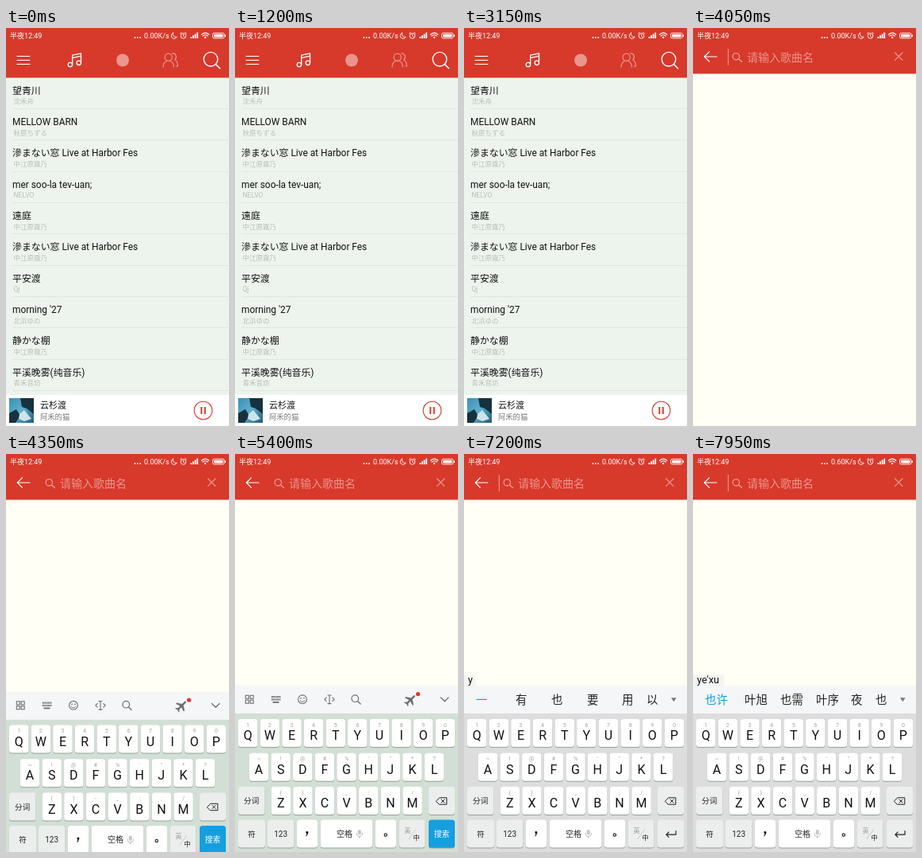
Animation of 281x500 px, one loop 8 s. Source, as an HTML page:

```html
<!DOCTYPE html>
<html lang="zh">
<head>
<meta charset="utf-8">
<style>
  html, body { margin: 0; width: 100%; height: 100%; overflow: hidden; }
  svg { display: block; width: 100%; height: 100%; font-family: Roboto, "Noto Sans CJK SC", "Noto Sans CJK", sans-serif; }
  .line { fill: none; stroke-linecap: round; stroke-linejoin: round; }
</style>
</head>
<body>
<svg id="stage" viewBox="0 0 281 500" preserveAspectRatio="none"></svg>
<script>
const LOOP = 8000;
const RED = '#d7392b', PINK = '#eb958d', GRAY = '#6d7072', BLUE = '#159fe0';

const songs = [
  ['望青川', '沈禾舟'],
  ['MELLOW BARN', '秋原ちずる'],
  ['滲まない窓 Live at Harbor Fes', '中江原霧乃'],
  ['mer soo-la tev-uan;', 'NELVO'],
  ['遠庭', '中江原霧乃'],
  ['滲まない窓 Live at Harbor Fes', '中江原霧乃'],
  ['平安渡', 'Qj'],
  ["morning '27", '北浜ゆの'],
  ['静かな棚', '中江原霧乃'],
  ['平溪晚雾(纯音乐)', '青禾音坊']
];

// Input states: start time, pinyin, candidates
const typing = [
  [7050, 'y', ['一', '有', '也', '要', '用', '以']],
  [7350, 'ye', ['也', '夜', '业', '叶', '页', '爷']],
  [7650, "ye'x", ['也许', '也想', '也行', '也需', '夜', '也']],
  [7800, "ye'xu", ['也许', '叶旭', '也需', '叶序', '夜', '也']]
];
const candidateX = [15, 65, 110, 155, 199, 230];

const text = (x, y, size, fill, str, extra = '') =>
  `<text x="${x}" y="${y}" font-size="${size}" fill="${fill}" ${extra}>${str}</text>`;
const centered = (x, y, size, fill, str) => text(x, y, size, fill, str, 'text-anchor="middle"');
const rect = (x, y, w, h, fill, rx = 0) =>
  `<rect x="${x}" y="${y}" width="${w}" height="${h}" rx="${rx}" fill="${fill}"/>`;
const line = (d, color, width = 1) =>
  `<path class="line" d="${d}" stroke="${color}" stroke-width="${width}"/>`;
const ring = (x, y, r, color, width = 1) =>
  `<circle cx="${x}" cy="${y}" r="${r}" fill="none" stroke="${color}" stroke-width="${width}"/>`;
const dot = (x, y, r, fill) => `<circle cx="${x}" cy="${y}" r="${r}" fill="${fill}"/>`;

function statusBar() {
  const w = '#fff';
  const bars = [0, 1, 2, 3].map(i => rect(232.5 + i * 2.6, 11 - i * 1.8, 1.8, 2 + i * 1.8, w)).join('');
  return text(5, 12.9, 9, w, '半夜12:49')
    + [162.5, 165.8, 169.1].map(x => dot(x, 12, 0.95, w)).join('')
    + text(174, 12.9, 9, w, '0.00K/s', 'id="speed"')
    + line('M210.4 6.2a3.7 3.7 0 1 0 4.8 5a4 4 0 0 1-4.8-5z', w, 0.9)
    + ring(223.5, 9.9, 3.3, w, 0.9) + line('M223.5 8v2.1l1.5 .8M219.6 7l1.7-1.5M227.4 7l-1.7-1.5', w, 0.9)
    + bars
    + line('M246.4 8.2q4.7-4 9.4 0M248 10q3.1-2.5 6.2 0', w, 1.2) + dot(251.1, 11.9, 1.2, w)
    + `<rect x="260.5" y="6.3" width="14.5" height="6.6" rx="1.8" fill="none" stroke="#fff" stroke-width=".9"/>`
    + rect(262, 7.8, 11.5, 3.6, w, 0.8) + rect(275.6, 8.2, 1.4, 2.8, w, 0.5);
}

function listPage() {
  const rows = songs.map(([title, artist], i) => {
    const y = i * 39.35;
    return text(8, 82.5 + y, 11.9, '#111', title)
      + text(9.5, 95.2 + y, 8.5, '#b9beb9', artist)
      + rect(8, Math.round(101 + y), 273, 1, '#e1e7e0');
  }).join('');
  const header = rect(0, 0, 281, 62.5, RED)
    + line('M14 35.5H30M14 40.5H30M14 45.5H30', '#fff', 1)
    + line('M83.7 46V34.2L94.5 31.8V43.5M83.7 37.6L94.5 35.2', '#fff', 1.3)
    + ring(80.9, 46, 2.7, '#fff', 1.3) + ring(91.8, 43.8, 2.7, '#fff', 1.3)
    + dot(147, 40.5, 8, PINK)
    + ring(204.7, 36.7, 4.6, PINK, 1.2)
    + line('M198 49c0-4 2.2-6.8 5-7.8M206.4 41.2c2.8 1 5 3.8 5 7.8', PINK, 1.2)
    + line('M209.5 32c4.8-.5 6.5 5 3.2 8c2.4 1.2 3.8 4 3.8 8h-2.4', PINK, 1.2)
    + ring(258, 39.2, 8.8, '#fff', 1.4) + line('M264.4 45.6l5.2 5.2', '#fff', 1.5);
  const player = rect(0, 461, 281, 39, '#fff')
    + rect(4, 465, 31, 31, 'url(#cover)')
    + `<path d="M18 465h17v20l-9-7-6-2zM4 484l9-5 5 8-6 9H4z" fill="#17323f"/>`
    + `<path d="M17 485l6-5 9 11-9 3-7-3z" fill="#cfe4ea"/>`
    + text(43, 478.2, 11, '#111', '云杉渡')
    + text(43, 491.6, 9.3, '#777', '阿禾的猫')
    + ring(248.5, 480.5, 11.3, RED, 1.1)
    + rect(245.3, 476, 1.9, 9, RED) + rect(249.8, 476, 1.9, 9, RED);
  return rect(0, 0, 281, 500, '#edf4ed') + rows + header + player;
}

function searchPage() {
  return rect(0, 0, 281, 500, '#fffff6') + rect(0, 0, 281, 57.5, RED)
    + line('M30 36H14.5M20.5 29.8L14.3 36L20.5 42.2', '#fff', 1.2)
    + `<g id="cursor">${rect(43.8, 26, 0.9, 21, '#f0a8a0')}</g>`
    + ring(54.3, 35.8, 4.2, PINK, 1.3) + line('M57.5 39l4 3.4', PINK, 1.5)
    + text(68, 42, 14, PINK, '请输入歌曲名')
    + line('M254.5 31l9.4 9.4M263.9 31l-9.4 9.4', PINK, 1.3);
}

const key = (x, y, w, fill = '#fff') =>
  rect(x, y + 1, w, 35, '#93a097', 3.5) + rect(x, y, w, 35, fill, 3.5);

function letterRow(letters, hints, firstX, y) {
  return [...letters].map((letter, i) => {
    const x = firstX + i * 27.63;
    return key(x - 12.2, y, 24.4)
      + centered(x, y + 9.6, 7, '#a0a4a2', hints[i])
      + centered(x, y + 26, 16, '#111', letter);
  }).join('');
}

function toolbar() {
  const squares = [[13.3, 303.3], [19.2, 303.3], [13.3, 309.2], [19.2, 309.2]]
    .map(([x, y]) => `<rect x="${x}" y="${y}" width="4" height="4" fill="none" stroke="${GRAY}" stroke-width="1.1"/>`).join('');
  let board = rect(47.5, 311, 8, 1.8, GRAY);
  for (let i = 0; i < 10; i++) board += rect(46 + i % 5 * 2.4, i < 5 ? 304 : 307.4, 1.7, 2.2, GRAY);
  return squares + board
    + ring(85, 308.3, 5.4, GRAY, 1.1) + dot(83, 306.8, 0.9, GRAY) + dot(87, 306.8, 0.9, GRAY)
    + line('M82 309.8q3 3.6 6 0', GRAY, 1)
    + line('M119 303v10.6M117 303h4M117 313.6h4M115.2 306l-2.4 2.3l2.4 2.3M122.8 306l2.4 2.3l-2.4 2.3', GRAY, 1.1)
    + ring(151.3, 307.2, 4.3, GRAY, 1.2) + line('M154.5 310.4l3.6 3.6', GRAY, 1.4)
    + `<path transform="translate(221 309) rotate(45)" fill="${GRAY}" d="M-1.2-7q1.2-2 2.4 0v4.6L7 1.2v1.8L1.2 1.2V5l2 1.7V8L0 7l-3.2 1V6.7l2-1.7V1.2L-7 3V1.2l5.8-3.6z"/>`
    + dot(230.6, 301.6, 2.7, '#e03a30')
    + line('M259.4 306l4.8 4.8l4.8-4.8', GRAY, 1.3);
}

function keyboard() {
  const side = '#ebeeec';
  return `<rect id="deck" y="326" width="281" height="174"/>`
    + rect(0, 291, 281, 35, '#f5f6f7')
    + `<g id="tools">${toolbar()}</g><g id="candidates"></g>`
    + letterRow('QWERTYUIOP', '1234567890', 16.2, 333)
    + letterRow('ASDFGHJKL', '~!@#%\'"*?', 30, 375.7)
    + letterRow('ZXCVBNM', '()-_:;/', 57.8, 418)
    + key(4, 418, 33.5, side) + centered(20.7, 439.2, 9.6, '#222', '分词')
    + key(244, 418, 33, side)
    + line('M253.6 436l4-4.2h9.2v8.4h-9.2zM260 434l4 4M264 434l-4 4', '#222', 1)
    + key(4, 459.5, 34, side) + centered(21, 480.8, 9.6, '#222', '符')
    + key(41, 459.5, 33.5, side) + centered(57.7, 480.6, 10, '#222', '123')
    + key(78, 459.5, 26) + `<path d="M89.3 475.5a1.6 1.6 0 1 1 2.4 1.4q0 2.4-2.1 3.3l-.3-.7q1.2-.8 1-2.2z" fill="#111"/>`
    + key(107.7, 459.5, 65.6) + text(128, 480.8, 10, '#222', '空格')
    + rect(154.8, 472, 4, 6.5, '#c4c8c6', 2) + line('M153 476.5q.3 4 3.8 4q3.5 0 3.8-4M156.8 480.5v2', '#b0b4b2', 0.9)
    + key(177, 459.5, 26) + ring(189.8, 478.5, 1.7, '#111', 1.1)
    + key(207, 459.5, 32.5, side) + text(213.5, 475.8, 8, '#999', '英') + text(224.5, 485.2, 8, '#111', '中')
    + line('M219 483.5l8.5-11.5', '#b5b8b6', 0.7)
    + `<g id="searchKey">${key(244, 459.5, 33, BLUE)}${centered(260.5, 480.8, 9.8, '#fff', '搜索')}</g>`
    + `<g id="enterKey">${key(244, 459.5, 33, side)}${line('M267 473.5v4.6h-12M258 475l-3.2 3.1l3.2 3.1', '#222', 1.2)}</g>`;
}

function candidateBar(pinyin, words) {
  return rect(0, 277.5, 9 + pinyin.length * 6, 14, '#f3f5f3')
    + text(5, 288.3, 12.6, '#111', pinyin)
    + words.map((word, i) => text(candidateX[i], 314.2, 14.4, i ? '#222' : BLUE, word)).join('')
    + `<path d="M261 306.3h6.6l-3.3 5z" fill="#777"/>`;
}

document.getElementById('stage').innerHTML =
  `<defs><linearGradient id="cover" x2="1" y2="1"><stop stop-color="#3c8fb4"/><stop offset=".5" stop-color="#5eb0cc"/><stop offset="1" stop-color="#245a74"/></linearGradient></defs>
  <g>${listPage()}</g><g id="search">${searchPage()}</g><g id="keyboard">${keyboard()}</g><g>${statusBar()}</g>`;

const el = id => document.getElementById(id);
const parts = Object.fromEntries(
  ['search', 'cursor', 'keyboard', 'deck', 'tools', 'candidates', 'searchKey', 'enterKey', 'speed'].map(id => [id, el(id)]));
const show = (node, on) => node.setAttribute('display', on ? 'inline' : 'none');
const progress = (t, from, to) => Math.min(1, Math.max(0, (t - from) / (to - from)));
const easeOut = p => 1 - (1 - p) ** 3;
let shownPinyin = null;

function render(t) {
  const slide = easeOut(progress(t, 3450, 3750));
  show(parts.search, slide > 0);
  parts.search.setAttribute('transform', `translate(${281 * (1 - slide)} 0)`);
  show(parts.cursor, t < 3750 || (t - 3750) % 1000 < 500);

  const rise = easeOut(progress(t, 4150, 4450));
  show(parts.keyboard, rise > 0);
  parts.keyboard.setAttribute('transform', `translate(0 ${209 * (1 - rise)})`);

  const input = typing.filter(([start]) => t >= start).pop();
  const pinyin = input ? input[1] : '';
  if (pinyin !== shownPinyin) {
    parts.candidates.innerHTML = input ? candidateBar(pinyin, input[2]) : '';
    shownPinyin = pinyin;
  }
  parts.deck.setAttribute('fill', input ? '#dcdddc' : '#d2dfd4');
  show(parts.tools, !input);
  show(parts.searchKey, !input);
  show(parts.enterKey, input);
  parts.speed.textContent = t >= 7800 ? '0.60K/s' : '0.00K/s';
}

const startTime = performance.now();
function tick() {
  render((performance.now() - startTime) % LOOP);
  requestAnimationFrame(tick);
}
tick();
</script>
</body>
</html>
```
